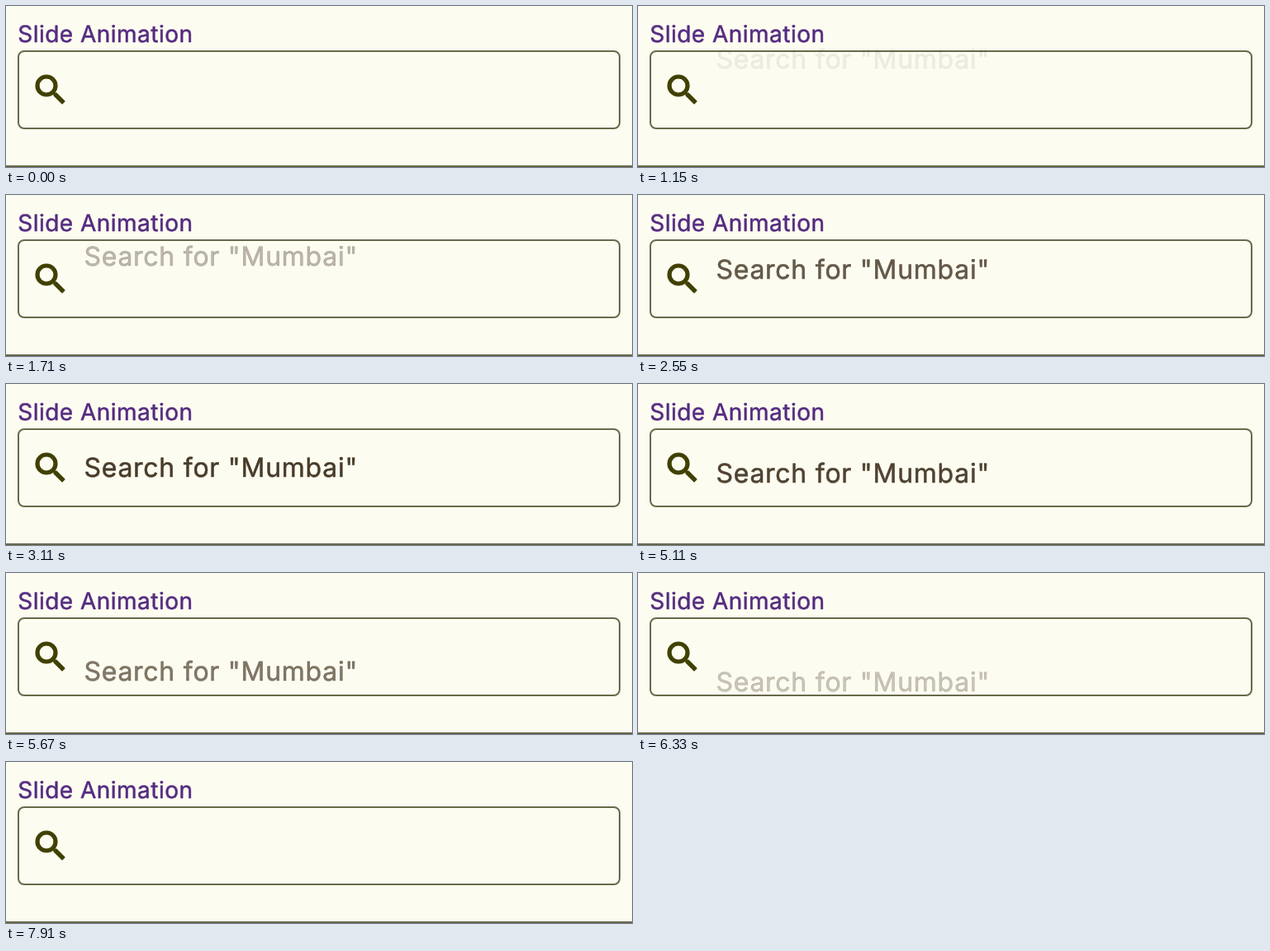
These frames come from a looping animation (758x196 px, 8000 ms). An HTML page with a canvas:

```html
<!DOCTYPE html>
<html lang="en">
<head>
<meta charset="utf-8">
<title>Slide Animation</title>
<style>
  html, body { margin: 0; width: 100%; height: 100%; overflow: hidden; background: #fcfcf0; }
  canvas { display: block; width: 758px; height: 196px; }
</style>
</head>
<body>
<canvas id="stage" width="758" height="196"></canvas>
<script>
const LOOP = 8000;
const SLIDE = 23; // slide distance in dp
const COLORS = { paper: '#fcfcf0', title: '#552b80', line: '#69694a', ink: '#404000', fading: '#483a28' };
const FONT = 'Inter, "Open Sans", sans-serif';
const ctx = document.getElementById('stage').getContext('2d');
const glass = new Path2D('M15.5 14h-.79l-.28-.27C15.41 12.59 16 11.11 16 9.5 16 5.91 13.09 3 9.5 3S3 5.91 3 9.5 5.91 16 9.5 16c1.61 0 3.09-.59 4.23-1.57l.27.28v.79l5 4.99L20.49 19l-4.99-5zm-6 0C7.01 14 5 11.99 5 9.5S7.01 5 9.5 5 14 7.01 14 9.5 11.99 14 9.5 14z');

const clamp = v => Math.min(1, Math.max(0, v));
const smooth = p => p * p * (3 - 2 * p);

// Uneven playback: ticks last 20, 20 and 100 ms in turn.
function tickAt(ms) {
  const u = ms + 110;
  const rest = u % 140;
  return 3 * (Math.floor(u / 140) - 1) + (rest < 20 ? 0 : rest < 40 ? 1 : 2);
}

// A thin outline gives the letters their slightly heavier weight.
function label(text, x, y, size, spacing, color) {
  ctx.font = `400 ${size}px ${FONT}`;
  ctx.letterSpacing = spacing + 'px';
  ctx.fillStyle = ctx.strokeStyle = color;
  ctx.lineWidth = 0.25;
  ctx.fillText(text, x, y);
  ctx.strokeText(text, x, y);
}

function drawField() {
  ctx.fillStyle = COLORS.paper;
  ctx.fillRect(0, 0, 379, 98);
  label('Slide Animation', 7.1, 22.1, 14, 0.24, COLORS.title);

  ctx.strokeStyle = COLORS.line;
  ctx.lineWidth = 1;
  ctx.beginPath();
  ctx.roundRect(7.5, 27.5, 364, 47, 3.5);
  ctx.stroke();
  ctx.fillStyle = COLORS.line;
  ctx.fillRect(0, 97, 379, 1);

  ctx.save();
  ctx.translate(15, 39);
  ctx.fillStyle = ctx.strokeStyle = COLORS.ink;
  ctx.lineWidth = 0.6;
  ctx.fill(glass);
  ctx.stroke(glass);
  ctx.restore();
}

function drawHint(tick) {
  const enter = clamp((tick - 15) / 52.5);
  const leave = clamp((tick - 104) / 48);
  const shown = enter - leave;
  if (shown < 0.14) return;
  ctx.globalAlpha = smooth(shown);
  const y = 57 + SLIDE * (leave - (1 - enter));
  label('Search for "Mumbai"', 47.2, y, 16, 0.37, shown < 1 ? COLORS.fading : COLORS.ink);
  ctx.globalAlpha = 1;
}

function render() {
  ctx.setTransform(2, 0, 0, 2, 0, 0);
  ctx.textRendering = 'geometricPrecision';
  ctx.lineJoin = 'round';
  drawField();
  drawHint(tickAt(performance.now() % LOOP));
  requestAnimationFrame(render);
}
render();
</script>
</body>
</html>
```
